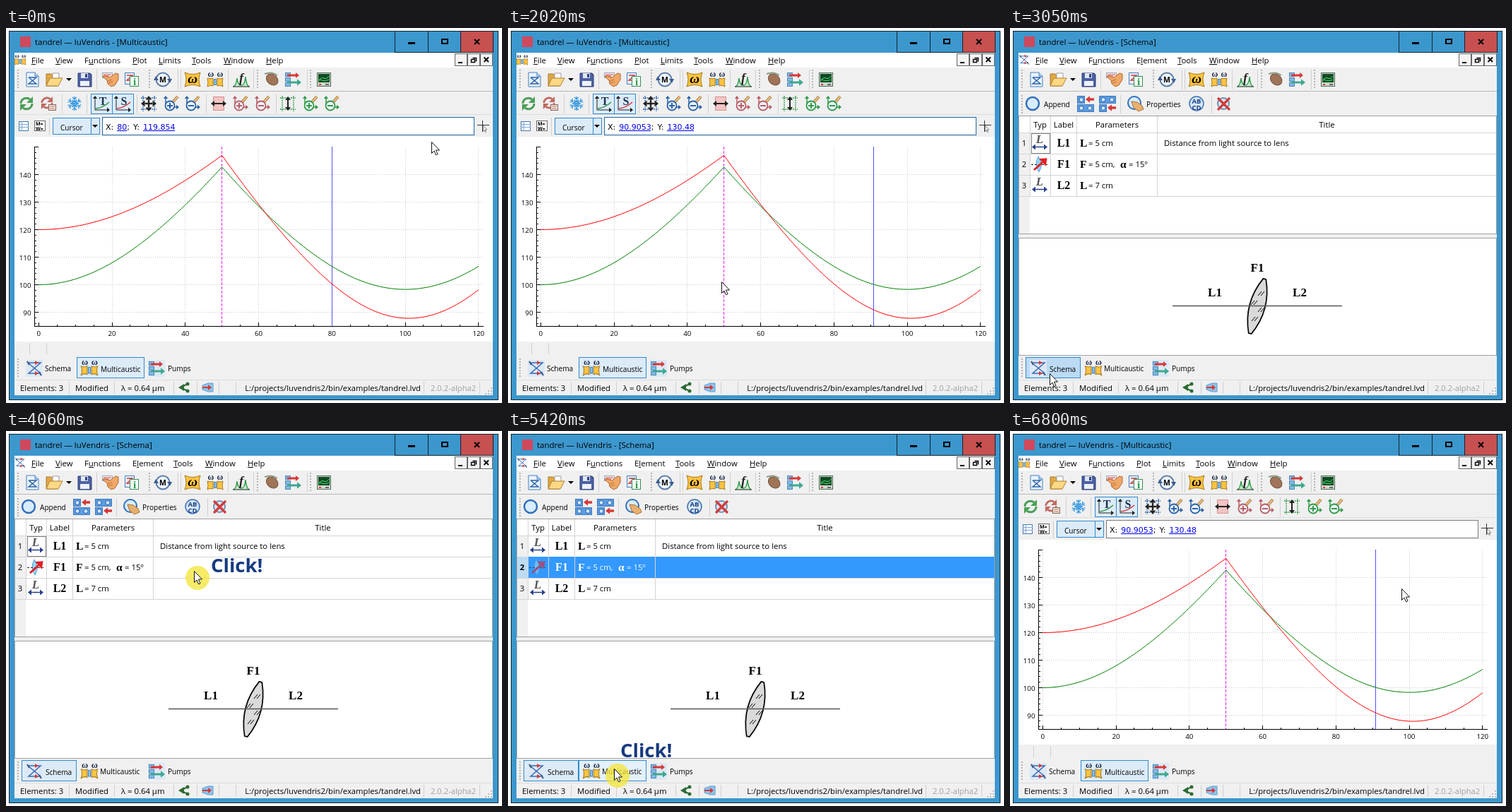
An HTML page with a canvas for the animation above (8.3 s loop, 702 by 531 pixels).

```html
<!DOCTYPE html>
<html lang="en">
<head>
<meta charset="utf-8">
<style>
html, body { margin: 0; width: 100%; height: 100%; overflow: hidden; background: #fff; }
canvas { display: block; }
</style>
</head>
<body>
<canvas id="stage" width="702" height="531"></canvas>
<script>
const ctx = document.getElementById('stage').getContext('2d');
const LOOP = 8300;
const SANS = '"Open Sans", "Noto Sans", sans-serif';
const SERIF = '"Liberation Serif", serif';
const UI = 11.35, SMALL = 10.1;
const GREY = '#f0f0f0', ACCENT = '#2f8ad0', BLUE = '#2a62a8', RED = '#d83838', GREEN = '#2f9a48', INK = '#222';
const APP = 'luVendris', DOC = 'tandrel';

// time, pointer x, pointer y, and the label position when clicking
const STEPS = [
  [0, 602, 161], [330, 554, 204], [660, 517, 244], [1010, 517, 244, 540, 239],
  [1340, 517, 244], [1690, 483, 264], [2020, 302, 359], [2370, 56, 489],
  [2700, 56, 489, 66, 463], [3050, 56, 489], [3380, 74, 474], [3710, 253, 252],
  [4060, 266, 198, 290, 200], [4390, 266, 198], [4740, 231, 264], [5090, 167, 412],
  [5420, 150, 478, 159, 462], [5770, 150, 478], [6110, 238, 410], [6460, 474, 265],
  [6800, 554, 223]
];

function rect(x, y, w, h, fill, stroke) {
  if (fill) { ctx.fillStyle = fill; ctx.fillRect(x, y, w, h); }
  if (stroke) { ctx.strokeStyle = stroke; ctx.lineWidth = 1; ctx.strokeRect(x + .5, y + .5, w - 1, h - 1); }
}
function path(d, fill, stroke, width = 1) {
  const p = new Path2D(d);
  if (fill) { ctx.fillStyle = fill; ctx.fill(p); }
  if (stroke) { ctx.strokeStyle = stroke; ctx.lineWidth = width; ctx.stroke(p); }
}
function dashed(pattern, draw) {
  ctx.setLineDash(pattern);
  draw();
  ctx.setLineDash([]);
}
function circle(x, y, r, fill, stroke, width = 1) {
  ctx.beginPath();
  ctx.arc(x, y, r, 0, 7);
  if (fill) { ctx.fillStyle = fill; ctx.fill(); }
  if (stroke) { ctx.strokeStyle = stroke; ctx.lineWidth = width; ctx.stroke(); }
}
function text(s, x, y, { size = UI, color = '#000', font = SANS, style = '', align = 'left' } = {}) {
  ctx.font = `${style} ${size}px ${font}`;
  ctx.fillStyle = color;
  ctx.textAlign = align;
  ctx.fillText(s, x, y);
  return ctx.measureText(s).width;
}
function at(x, y, draw, scale = 1) {
  ctx.save();
  ctx.translate(x, y);
  ctx.scale(scale, scale);
  draw();
  ctx.restore();
}
const vline = (x, y, h, color = '#d0d0d0') => rect(x, y, 1, h, color);
const hline = (x, y, w, color = '#d0d0d0') => rect(x, y, w, 1, color);
const serif = (s, x, y, size = 16, color = '#000', style = 'bold', align = 'left') =>
  text(s, x, y, { size, color, style, align, font: SERIF });
function handle(x, y, h) {
  for (let i = 0; i < h; i += 4) rect(x, y + i, 2, 2, '#b4b4b4');
}
function arrow(angle, from, to, color, width = 1.5, head = 4) {
  ctx.save();
  ctx.rotate(angle * Math.PI / 180);
  path(`M${from} 0H${to - head}`, null, color, width);
  path(`M${to} 0L${to - head}-${head * .8}V${head * .8}Z`, color);
  ctx.restore();
}

// icons, drawn around their centre
function schemaIcon() {
  path('M-9-8H9L-8 7H9M-9-8L9 7', null, '#3a68b4', 1.5);
  path('M-10-10L-7-5M10 10L7 5', null, '#40587c', 2);
  path('M1-11L6-8 1-5ZM1 4L6 7 1 10Z', RED);
}
function newDoc() {
  path('M-8-10H4L9-5V10H-8Z', '#eaf3ff', '#4680bc');
  path('M4-10V-5H9', '#bcd8f4', '#4680bc');
  path('M-5-3H6L-5 6H6L-5-3', null, BLUE, 1.4);
}
function openFolder() {
  path('M-11 9V-8H-4L-2-6H5V9Z', '#e0a848', '#a87828');
  path('M-2-9H7V2H-2Z', '#fff', '#999');
  path('M-11 9L-6-2H12L6 9Z', '#ffd884', '#b08030');
}
function floppy() {
  path('M-9-9H8L10-7V10H-9Z', '#4c60a4', '#2c3c74');
  rect(-5, -9, 10, 7, '#dfe6f4');
  rect(1, -8, 3, 5, '#34457e');
  rect(-6, 2, 13, 7, '#eef1f8');
}
function hand() {
  rect(-12, -10, 15, 8, '#f4f4f8', '#9aa4b4');
  path('M-10-7H1M-10-5H-2', null, RED);
  path('M-11-4Q-11-6-8-5L-1-3 7-9 11-8 11 0 6 8 1 10-4 6-5 1Z', '#f0a868', '#b0662c');
  path('M-4 2L2 0M-3 5L3 3', null, '#b87038');
}
function info() {
  rect(-10, -10, 14, 17, '#e6f1ff', '#4680bc');
  path('M-7-6H1L-7 1H1', null, RED, 1.4);
  rect(-3, -5, 13, 15, '#f2fff4', '#3c8a58');
  serif('i', 4, 8, 15, GREEN, 'bold', 'center');
}
function matrix() {
  circle(0, 0, 9.5, '#eef4fc', '#5c7eac', 2);
  path('M-13 1L-6 1-10-5ZM13-1L6-1 10 5Z', '#3c5c8c');
  text('M', 0, 4, { size: 10.5, style: 'bold', align: 'center' });
}
function caustic() {
  path('M-11-10Q0-5 11-10Q7 0 11 10Q0 5-11 10Q-7 0-11-10Z', '#ffc440', '#a87818');
  serif('ω', 0, 5, 19, '#000', 'italic bold', 'center');
}
function multicaustic() {
  path('M-11-2Q-7 0-3-2V9Q-7 7-11 10Q-9 4-11-2ZM11-2Q7 0 3-2V9Q7 7 11 10Q9 4 11-2Z', '#ffc440', '#a87818');
  rect(-2, -1, 4, 9, '#8cc4ee', '#4888bc');
  for (const x of [-6, 7]) serif('ω', x, -4, 12, '#1c2c4c', 'bold', 'center');
}
function chart() {
  path('M-11 10Q-7 8-6-2Q-5 8 0 8Q5 8 6-4Q7 8 11 10', '#c4e8cc', GREEN, 1.4);
  path('M-12 10H12', null, INK);
  serif('f', 0, 4, 18, INK, 'italic bold', 'center');
}
function bean() {
  ctx.save();
  ctx.rotate(.7);
  path('M-8-3A9 7 0 1 1 9 2A9 7 0 0 1-8-3Z', '#a07458', '#75513c');
  ctx.restore();
  path('M-10-8Q0-12 8-6', null, '#8c9c88', 2);
}
function pumps() {
  for (const y of [-10, -3, 4]) rect(-11, y, 8, 6, '#86b8e4', '#4888bc');
  at(0, -6, () => arrow(0, -8, 9, RED, 3, 5));
  at(0, 4, () => arrow(0, -8, 12, '#3fa890', 3, 6));
}
function scope() {
  rect(-10, -10, 20, 20, '#cfd8cf', '#4c6c50');
  rect(-8, -8, 16, 12, '#0f4a24');
  path('M-7 2Q-4-4 0-2T7-5M-7-1Q0 4 7 0', null, '#4ce070');
  rect(-7, 6, 3, 2, RED);
  rect(2, 6, 5, 2, '#666');
}
function refresh(color) {
  path('M-8 0A8 8 0 0 1 5-6M8 0A8 8 0 0 1-5 6', null, color, 3);
  path('M9-10V-1H0ZM-9 10V1H0Z', color);
}
function refreshPage() {
  at(-2, -1, () => refresh('#c06860'), .9);
  rect(0, 1, 11, 9, '#f4e8e0', '#886058');
  path('M2 4H9M2 7H9', null, '#b07060');
}
function snowflake() {
  for (let i = 0; i < 6; i++) {
    ctx.save();
    ctx.rotate(i * Math.PI / 3);
    path('M0 0V-10M-3-9L0-6 3-9M-3-5L0-2 3-5', null, '#3b9be0', 1.4);
    ctx.restore();
  }
}
function planeGraph(letter, color) {
  rect(-15, -14, 31, 29, '#dcebf8', ACCENT);
  at(-9, 9, () => { arrow(-90, 0, 20, INK, 1, 4); arrow(0, 0, 21, INK, 1, 4); });
  path('M-8 7Q2 6 11-2', null, color, 1.6);
  serif(letter, 2, 2, 16, '#1d3050', 'bold', 'center');
}
function dottedGrid(color) {
  dashed([2, 1], () => path('M-11-8H11M-11 8H11M-8-11V11M8-11V11', null, color, 1.3));
}
function fitAll() {
  dottedGrid(BLUE);
  for (let a = 0; a < 360; a += 90) arrow(a, 0, 11, INK, 2.4, 5.5);
}
function fitX() {
  rect(-8, -10, 16, 20, '#f4c4c4', '#d89090');
  for (const a of [0, 180]) arrow(a, 0, 11, INK, 2, 5);
}
function fitY() {
  dottedGrid(GREEN);
  for (const a of [90, -90]) arrow(a, 0, 10, INK, 2, 5);
}
function zoom(color, plus) {
  at(-7, 5, () => { arrow(-90, 0, 16, color, 1.5, 4); arrow(0, 0, 19, color, 1.5, 4); });
  path('M3-2L10-10', null, '#a87840', 4);
  path('M3-2L10-10', null, '#e8c080', 2);
  circle(-1, 3, 6.5, '#edf5ff', color, 1.8);
  path(plus ? 'M-5 3H3M-1-1V7' : 'M-5 3H3', null, color, 2);
}
function ring() { circle(0, 0, 9, '#d8edff', '#2f70bc', 2.5); }
function insert(flip) {
  const y = flip ? 6 : -6;
  rect(-12, y - 5, 11, 11, '#5c9ce0', '#3c78c0');
  rect(-12, -y - 5, 24, 11, '#5c9ce0', '#3c78c0');
  for (const [cx, cy] of [[-6, y], [-6, -y], [6, -y]]) circle(cx, cy + .5, 3, '#cfe6ff', '#2a62a8');
  at(6, y, () => arrow(180, -6, 6, RED, 3.5, 6));
}
function props() {
  circle(-2, -1, 9, '#d8edff', '#2f70bc', 2);
  path('M-6-3L2-2 9 3 11 8 4 11-3 6Z', '#e8b070', '#a87030');
}
function abcd() {
  circle(0, 0, 10, '#d4e8fc', '#3c70b0', 1.5);
  for (const [s, y] of [['AB', 0], ['CD', 9]])
    text(s, 0, y, { size: 9.5, style: 'bold', color: '#1c3c80', align: 'center' });
}
function remove() {
  circle(0, 0, 8, '#d8e8f4', '#7090b0', 2);
  path('M-8-8L9 9M9-8L-8 9', null, '#d03c3c', 3.2);
}
function distance() {
  serif('L', 0, 0, 17, '#555', 'italic bold', 'center');
  at(0, 5.5, () => { for (const a of [0, 180]) arrow(a, -4, 11, '#27408c', 1.3, 5); });
}
function tiltedLens() {
  path('M-2-11Q6 0-1 11Q-8 0-2-11Z', '#98d4f4', '#4ba4d4');
  dashed([3, 2], () => path('M-12 .5H12', null, INK));
  at(-8, 8, () => arrow(-42, 0, 25, '#e02028', 3, 9));
}

function row(y, items) {
  for (const [x, draw, ...args] of items) at(x, y, () => draw(...args));
}

function windowFrame(schema) {
  rect(0, 0, 702, 531, '#fff');
  rect(4, 4, 693, 523, '#3c97cd', '#10242f');
  rect(12, 35, 677, 485, GREY);
  rect(20, 12, 15, 15, '#d0485c');
  text(`${DOC} — ${APP} - [${schema ? 'Schema' : 'Multicaustic'}]`, 41, 24, { size: 11.5 });
  rect(550, 4, 48, 31, null, '#10242f');
  rect(597, 4, 47, 31, null, '#10242f');
  rect(643, 4, 47, 31, '#c75050', '#10242f');
  rect(569, 20, 10, 3, '#000');
  path('M617 16H625V22H617Z', null, '#000', 2);
  path('M663 16L670 23M670 16L663 23', null, '#000', 2);
}

function menuBar(schema) {
  rect(12, 35, 677, 21, '#fff');
  at(20, 45, schema ? schemaIcon : multicaustic, schema ? .65 : .72);
  const menus = schema
    ? [['File', 36], ['View', 70], ['Functions', 111, 1], ['Element', 179, 1], ['Tools', 237], ['Window', 282], ['Help', 342]]
    : [['File', 36], ['View', 70], ['Functions', 111, 1], ['Plot', 179], ['Limits', 216], ['Tools', 263], ['Window', 308], ['Help', 368]];
  for (const [name, x, key = 0] of menus) {
    text(name, x, 50);
    const before = ctx.measureText(name.slice(0, key)).width;
    hline(Math.round(x + before), 51, Math.round(ctx.measureText(name[key]).width), '#000');
  }
  for (const x of [635, 653, 671]) rect(x, 36, 18, 18, '#f4f4f4', '#666');
  rect(640, 48, 6, 2, '#000');
  path('M660.5 42.5H665.5V47.5M658.5 44.5H663.5V48.5H658.5Z', null, '#000', 1.4);
  path('M676.5 41.5L683 48M683 41.5L676.5 48', null, '#000', 1.8);
}

function mainToolbar() {
  for (const x of [16, 202, 355, 430]) handle(x, 59, 28);
  for (const x of [128, 243, 247, 314, 350, 426]) vline(x, 59, 28);
  row(73, [[37, newDoc], [68, openFolder], [111, floppy], [148, hand], [178, info], [222, matrix],
    [264, caustic], [296, multicaustic], [333, chart], [376, bean], [406, pumps], [450, scope]]);
  path('M85 71H93L89 75Z', '#000');
  hline(12, 89, 677, '#b8b8b8');
}

function plotToolbars(point, focused) {
  row(107, [[29, refresh, '#4a9f58'], [60, refreshPage], [97, snowflake], [135, planeGraph, 'T', GREEN],
    [165, planeGraph, 'S', RED], [202, fitAll], [233, zoom, BLUE, true], [263, zoom, BLUE, false],
    [301, fitX], [331, zoom, '#b85c64', true], [362, zoom, '#b85c64', false],
    [399, fitY], [430, zoom, GREEN, true], [460, zoom, GREEN, false]]);
  for (const x of [79, 114, 185, 283, 382]) vline(x, 94, 27);
  hline(12, 122, 677, '#dcdcdc');

  rect(18, 132, 14, 14, '#fff', '#3f78b4');
  path('M18 136.5H32M18 140.5H32M22.5 132V146', null, '#7fa8d4');
  rect(40, 131, 16, 15, '#fff', '#666');
  text('M=', 42, 138, { size: 7, style: 'bold' });
  text('W=', 42, 145, { size: 7, style: 'bold' });
  vline(61, 127, 25);
  rect(66, 127, 67, 24, '#dcebf8', ACCENT);
  vline(120, 127, 24, ACCENT);
  text('Cursor', 77, 145, { size: SMALL });
  path('M122 137H130L126 141Z', '#000');

  rect(136, 126, 527, 26, '#fff', focused ? '#1f66a0' : '#7a7a7a');
  let x = 141;
  for (const [s, link, gap] of [['X:', 0, 5], [point.x, 1, 0], [';', 0, 5], ['Y:', 0, 5], [point.y, 1, 0]]) {
    const w = text(s, x, 144, { size: 11, font: '"DejaVu Sans", sans-serif', color: link ? '#0000e8' : '#000' });
    if (link) hline(Math.round(x), 145, Math.round(w), '#0000e8');
    x += w + gap;
  }
  path('M667 137.5H684M674.5 131V147', null, '#333');
  at(675, 138, arrowPointer, .5);
}

function plot(point) {
  const px = v => 45.8 + v * 5.1875, py = v => 363 - (v - 100) * 3.9;
  const left = 40, bottom = 422;
  rect(12, 154, 677, 290, '#fff');
  dashed([1, 2], () => {
    for (let v = 0; v <= 120; v += 20) path(`M${Math.round(px(v)) + .5} ${bottom}V168`, null, '#c8c8c8');
    for (let v = 90; v <= 140; v += 10) path(`M${left} ${Math.round(py(v)) + .5}H675`, null, '#c8c8c8');
  });
  for (let v = 0; v <= 120; v += 20) text(v, px(v) + .5, 436, { size: 9.8, align: 'center' });
  for (let v = 90; v <= 140; v += 10) text(v, 35.5, py(v) + 4.5, { size: 9.8, align: 'right' });

  vline(left, 168, bottom - 167, '#000');
  hline(left, bottom, 636, '#000');
  for (let v = 0; v <= 120; v += 5) {
    const h = v % 20 ? 2 : 5;
    vline(Math.round(px(v)), bottom - h, h, '#000');
  }
  for (let v = 86; v <= 150; v += 2) hline(left + 1, Math.round(py(v)), v % 10 ? 2 : 5, '#000');

  dashed([4, 2], () => path(`M305.5 168V${bottom}`, null, '#e820e8'));
  vline(Math.round(px(point.x)), 168, bottom - 168, '#5050ff');

  // beam radius w(z) = waist * sqrt(1 + ((z - centre) / range)^2) on each side of the lens
  const curve = (color, before, after) => {
    ctx.beginPath();
    for (let z = 0; z <= 120; z++) {
      const [waist, centre, range] = z <= 50 ? before : after;
      ctx.lineTo(px(z) + .5, py(waist * Math.hypot(1, (z - centre) / range)) + .5);
    }
    ctx.strokeStyle = color;
    ctx.lineWidth = 1;
    ctx.stroke();
  };
  curve('#008000', [100, 0, 49.1], [98.3, 100, 47.5]);
  curve('#ff0000', [120, 0, 70.7], [87.8, 101, 38]);

  rect(12, 444, 677, 19, GREY);
  vline(33, 446, 16);
  vline(57, 446, 16);
}

function schemaToolbar() {
  handle(16, 95, 26);
  row(107, [[32, ring], [107, insert, false], [138, insert, true], [178, props], [264, abcd], [302, remove]]);
  text('Append', 48, 112, { size: SMALL });
  text('Properties', 193, 112, { size: SMALL });
  for (const x of [156, 285]) vline(x, 95, 26);
}

function table(selected) {
  const line = '#d4d4d4';
  rect(12, 124, 677, 168, '#fff', '#a0a0a0');
  rect(13, 149, 15, 142, GREY);
  for (const [s, x] of [['Typ', 42.5], ['Label', 76], ['Parameters', 151.5], ['Title', 448.5]])
    text(s, x, 141, { align: 'center' });
  hline(13, 148, 675, line);
  const rows = [['L1', 'L', '= 5 cm'], ['F1', 'F', '= 5 cm,'], ['L2', 'L', '= 7 cm']];
  rows.forEach(([label, name, value], i) => {
    const top = 149 + i * 30, base = top + 18, on = selected && i === 1;
    const color = on ? '#fff' : '#000';
    if (on) {
      rect(13, top - 1, 15, 30, '#bcdcf4');
      rect(28, top - 1, 660, 30, '#3399ff');
    }
    text(i + 1, 20, base, { align: 'center', style: on ? 'bold' : '' });
    at(42, top + 14, i === 1 ? tiltedLens : distance);
    if (on) rect(29, top, 28, 28, 'rgba(51,153,255,.4)');
    serif(label, 76, base + 1, 16, color, 'bold', 'center');
    serif(name, 99, base + 1, 15.5, color);
    text(value, 111, base, { color });
    if (i === 1) {
      serif('α', 156, base + 1, 15.5, color);
      text('= 15º', 168, base, { color });
    }
    hline(13, top + 29, 675, line);
  });
  text('Distance from light source to lens', 218, 167);
  for (const x of [28, 57, 94, 208]) vline(x, 125, 113, line);
  if (!selected) dashed([1, 1], () => rect(30, 149, 27, 29, null, '#000'));
}

function scheme() {
  rect(12, 297, 677, 167, '#fff', '#a0a0a0');
  at(350, 394, () => {
    ctx.rotate(Math.PI / 12);
    path('M-2-40H2Q20 0 2 40H-2Q-20 0-2-40Z', '#dadada', '#000', 1.7);
  });
  path('M230 393.5H470', null, '#555', 1.3);
  for (const [x, y] of [[355, 376], [345, 389], [355, 399], [346, 412]])
    path(`M${x - 4} ${y + 3}L${x + 1} ${y - 3}M${x} ${y + 3}L${x + 5} ${y - 3}`, null, '#000');
  for (const [s, x, y] of [['F1', 350, 345], ['L1', 290, 380], ['L2', 410, 380]])
    serif(s, x, y, 17, '#000', 'bold', 'center');
}

function tabs(schema, x, y) {
  rect(12, 464, 677, 35, GREY);
  handle(16, 468, 28);
  const tab = (left, width, checked) => {
    const hover = x >= left && x < left + width && y >= 466 && y < 496;
    if (checked || hover)
      rect(left, 466, width, 30, checked ? (hover ? '#bcdaf3' : '#dcebf8') : '#e4f0fa', ACCENT);
  };
  tab(22, 78, schema);
  tab(100, 96, !schema);
  for (const [cx, icon] of [[40, schemaIcon], [213, pumps]]) {
    rect(cx - 12, 470, 24, 24, '#dce9f5');
    at(cx, 482, icon);
  }
  at(118, 481, multicaustic, 1.05);
  const push = on => on ? 1 : 0;
  text('Schema', 55 + push(schema), 486 + push(schema), { size: SMALL });
  text('Multicaustic', 133 + push(!schema), 486 + push(!schema), { size: SMALL });
  text('Pumps', 229, 486, { size: SMALL });
}

function statusBar() {
  hline(12, 498, 677, '#dcdcdc');
  for (const x of [89, 153, 237, 270, 301, 325, 591, 670]) vline(x, 501, 17);
  text('Elements: 3', 20, 514);
  text('Modified', 98, 514);
  text('λ = 0.64 µm', 163, 514);
  path('M257 504L247 509 257 514', null, '#2c6c34', 2);
  path('M244 509L252 504V514Z', '#2c6c34');
  for (const y of [504, 514]) circle(257, y, 2.5, '#2c6c34');
  path('M278 506L286 503H293V515H286L278 512Z', '#8cc4ec', '#5c9ccc');
  at(285, 509, () => arrow(0, -7, 6, RED, 2, 5));
  text(`L:/projects/${APP.toLowerCase()}2/bin/examples/${DOC}.lvd`, 587, 514, { align: 'right', size: 11.25 });
  text('2.0.2-alpha2', 601, 514, { color: '#a0a0a0', size: 11.2 });
  for (let i = 0; i < 3; i++)
    for (let j = 0; j <= i; j++) rect(686 - j * 4, 509 + i * 4, 2, 2, '#bbb');
}

function arrowPointer() {
  path('M.5 .5V16.5L4 13 6.5 18.8 9 17.7 6.5 12H11.5Z', '#fff', '#111');
}

function drawClick(x, y, labelX, labelY) {
  circle(x + 5, y + 10, 17, 'rgba(244,230,60,.78)');
  text('Click!', labelX, labelY, { size: 27.5, style: 'bold', color: '#163a80' });
}

function draw(t) {
  const [, x, y, labelX, labelY] = STEPS.findLast(step => step[0] <= t);
  const schema = t >= 3050 && t < 5770;
  const point = t < 1340 ? { x: '80', y: '119.854' } : { x: '90.9053', y: '130.48' };

  windowFrame(schema);
  menuBar(schema);
  mainToolbar();
  if (schema) {
    schemaToolbar();
    table(t >= 4390);
    scheme();
  } else {
    plotToolbars(point, t < 3050);
    plot(point);
  }
  tabs(schema, x, y);
  statusBar();
  if (labelX !== undefined) drawClick(x, y, labelX, labelY);
  at(x, y, arrowPointer);
}

const start = performance.now();
function tick() {
  draw((performance.now() - start) % LOOP);
  requestAnimationFrame(tick);
}
tick();
</script>
</body>
</html>
```
